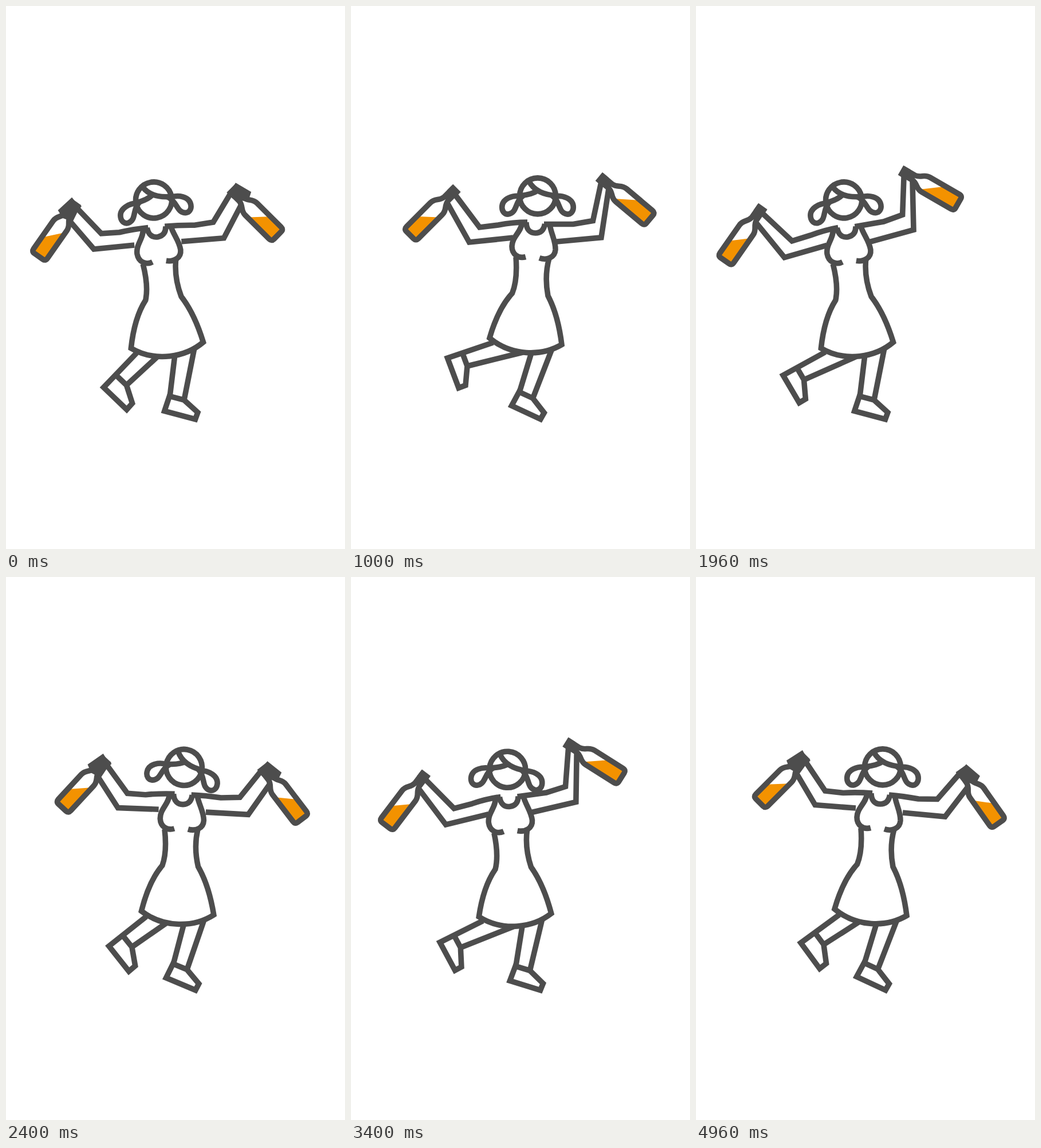
An HTML page for the animation above (5000 ms loop, 592 px wide and 947 px high).

```html
<!DOCTYPE html>
<html lang="en">
<head>
<meta charset="utf-8">
<title>Dancer</title>
<style>
html, body { margin: 0; width: 100%; height: 100%; overflow: hidden; background: #fff; }
svg { display: block; width: 100vw; height: 100vh; }
.line { fill: none; stroke: #4d4d4d; stroke-width: 9.6; stroke-miterlimit: 10; }
.dark { fill: #4d4d4d; stroke: none; }
.drink { fill: #f39200; stroke: none; }
.glass { fill: #fff; stroke: none; }
</style>
</head>
<body>
<svg viewBox="0 0 592 947">
  <g id="dancer" class="line">
    <!-- standing leg -->
    <path d="M315 605 L294 674 M351 598 L318 683"/>
    <path d="M280.500 697 L293.500 673 L317.500 684 L337.300 709.500 L331 720.500 Z"/>
    <g id="poseA"></g>
    <g id="poseB"></g>
    <!-- dress -->
    <path d="M306 377 C306 390 313 396 322 396 C331 396 337 391 338.500 380"/>
    <path d="M299 377 C297 395 281.500 402 281 419 C281 433 292 441 305 437.500"/>
    <path d="M347 380 C349 397 357.500 409 357 425 C356 439 342 444 329 439.500"/>
    <path d="M288 438 C290 464 288 485 281.500 501 C263 521 251 548 242 579
             C280 611 333 611 368 590.500 C364 558 357 530 344 505.500 C339.500 482 340.500 460 346 440"/>
    <g id="head">
      <circle cx="326" cy="331.400" r="31.500"/>
      <path d="M311 306 C319 321 336 329.500 360 331"/>
      <path d="M328 320.500 C318 328 307 330 294 331"/>
      <g id="tail"><path d="M299 332 C282 329 263.700 336 263.700 351 C263.700 359 269 363.700 275 363 C290 360.500 286 343 299 332 Z"/></g>
      <use href="#tail" transform="matrix(-1 0 0 1 652 0)"/>
    </g>
  </g>
</svg>
<script>
const $ = id => document.getElementById(id);
const HALF = 1000, LOOP = 5000, STEP = 40, LEAN = 10, NOD = 12.5;

// Bottle standing on its base at (x, y), turned by deg; l and r are the drink levels at the walls.
function bottle(x, y, deg, l, r) {
  const shape = "M-9 -5 H9 Q14.700 -5 14.700 -11 V-70 C14.700 -82 6 -83 4.700 -94 V-116 " +
                "H-4.700 V-94 C-6 -83 -14.700 -82 -14.700 -70 V-11 Q-14.700 -5 -9 -5 Z";
  return `<g transform="translate(${x} ${y}) rotate(${deg})">
    <path class="glass" d="${shape}"/>
    <path class="drink" d="M-13 -7 H13 V${-r} L-13 ${-l} Z"/>
    <path d="${shape}"/>
    <path class="dark" d="M-9.500 -106 H9.500 V-119 H-9.500 Z"/></g>`;
}

const path = (d, cls = "line") => `<path class="${cls}" d="${d}"/>`;

$("poseA").innerHTML =
  path("M308 377 Q280 375 257 376.500 L225.500 373 L188 317 M279 403 L208 397.500 L174 340") +
  path("M337 380 Q362 382 388.500 387 L421.500 387.500 L462 341 M361 411 L435 418 L478 362") +
  path("M250 589 L183 638 L216 683 L227.500 674 L223 641 L207.500 620 M223 641 L284 602") +
  bottle(107.3, 396.7, 45, 36.5, 64.5) +
  bottle(531, 433.8, -35.2, 63, 38.7) +
  path("M158 320 L186 302 L191 311 L200 320 L191 329 L180 344 L164 335 Z", "dark") +
  path("M472 326.500 L496 347 L488 362 L465 356 L455 344 Z", "dark");

$("poseB").innerHTML =
  path("M308 377 Q283 377 257 382 L224.500 386 L181 328 M283 404 L206.500 412 L169 345") +
  path("M337 380.500 L388 380.500 L422.500 374.500 L438 302 M359 411 L437 403.700 L450.500 315") +
  path("M248 587 L168.500 614 L188 666 L200 661.500 L203 628 L194.500 605 M203 628 L300 604") +
  bottle(99.5, 403, 45, 38, 61.7) +
  bottle(525.4, 375, -50, 76, 41);

// Cubic Bezier easing with handles (1/3, 0) and (0, 1).
function ease(x) {
  let lo = 0, hi = 1;
  for (let i = 0; i < 30; i++) {
    const s = (lo + hi) / 2;
    if (s * (1 - s) ** 2 + s ** 3 < x) lo = s; else hi = s;
  }
  return lo * lo * (3 - 2 * lo);
}

function draw(ms) {
  const t = Math.floor((ms % LOOP + 0.5) / STEP) * STEP % LOOP;
  const back = Math.floor(t / HALF) % 2 === 1;
  const u = t % HALF / HALF;
  const p = ease(u);
  const nod = u < 0.5 ? ease(2 * u) : 1 - ease(2 * u - 1);
  $("dancer").setAttribute("transform", `rotate(${-LEAN * (back ? p : 1 - p)} 332 723)`);
  $("head").setAttribute("transform", `rotate(${NOD * nod} 326 332)`);
  $("poseA").style.display = back ? "none" : "";
  $("poseB").style.display = back ? "" : "none";
}

const start = performance.now();
function tick() {
  draw(performance.now() - start);
  requestAnimationFrame(tick);
}
draw(0);
requestAnimationFrame(tick);
</script>
</body>
</html>
```
